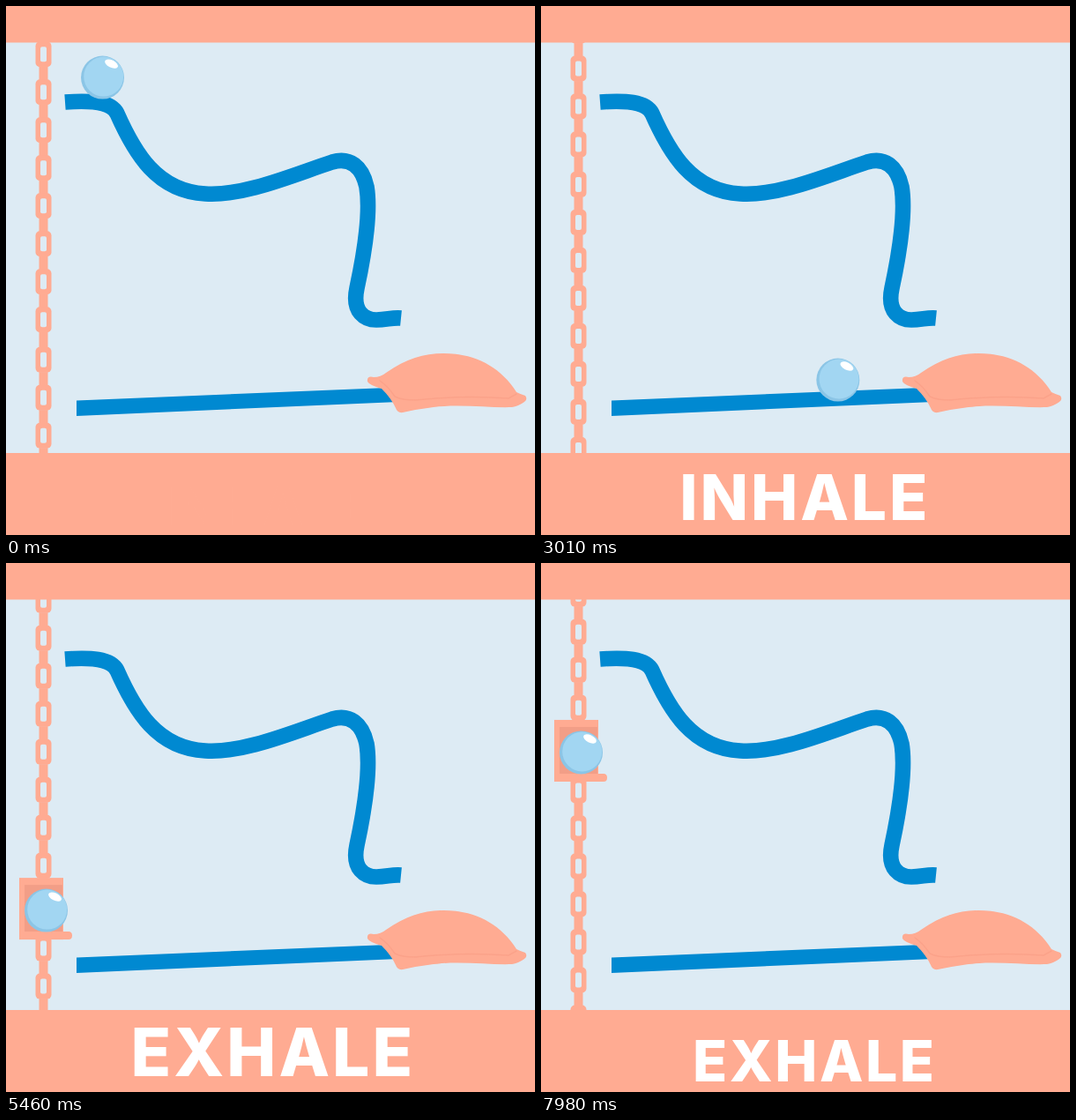
An HTML page for the animation above (8 s loop, 600 by 600 pixels).

```html
<!DOCTYPE html>
<html lang="en">
<head>
<meta charset="utf-8">
<title>Breathing marble run</title>
<style>
  html, body { margin: 0; width: 100%; height: 100%; overflow: hidden; background: #ddebf4; }
  svg { display: block; width: 100vw; height: 100vh; }
  text { font-family: Inter, "Open Sans", sans-serif; font-weight: 800; letter-spacing: .04em; text-anchor: middle; fill: #fff; }
</style>
</head>
<body>
<svg viewBox="0 0 600 600">
  <rect width="600" height="600" fill="#ddebf4"/>
  <path fill="none" stroke="#0089d1" stroke-width="17.600" d="M67 109C95 107 119 108 126 122C146 167 171 210 226 213C270 216 327 191 370 177C390 171 404 182 409 205C414 235 407 278 398 320C392 348 408 356 420 356C432 356 438 353 448 354"/>
  <path fill="#0089d1" d="M80 447.500V465L445 449V432.500Z"/>
  <path id="rail" fill="none" d="M109 81C135 86 140 112 158 140C180 180 205 192 245 190C290 188 335 160 378 152C410 150 430 185 430 225C430 265 420 295 418 315C417 332 424 334 430 331"/>
  <g id="pillow">
    <path fill="#ffab92" d="M410 426Q409 419 417 421Q425 421 431 416C454 400 474 394 496 394C530 394 560 408 579 438Q583 440 589 442Q592 446 588 449Q581 454 574 455C548 456 515 451 485 455Q468 457 450 461Q444 462 442 456Q437 445 426 434Q412 430 410 426Z"/>
    <path fill="none" stroke="#fa9f87" stroke-width="1.500" stroke-linecap="round" opacity=".7" d="M424 425Q434 432 441 443Q449 447 464 447Q520 441 570 445L579 440"/>
  </g>
  <g id="lift">
    <g id="chain"></g>
    <rect x="15" width="50" height="70" fill="#ffab92"/>
    <rect x="21" y="8" width="43" height="53" fill="#f29e87"/>
    <path fill="#ffab92" d="M15 61H71Q75 61 75 65.500Q75 70 71 70H15Z"/>
  </g>
  <g id="ball">
    <circle r="24.500" fill="#8bc5e6"/>
    <circle cx="1.200" cy="-1" r="22.500" fill="#a2d6f2"/>
    <ellipse cx="10" cy="-15.500" rx="8" ry="4.200" fill="#fff" transform="rotate(27 10 -15.500)"/>
  </g>
  <rect width="600" height="41.500" fill="#ffab92"/>
  <rect y="507" width="600" height="93" fill="#ffab92"/>
  <text id="inhale">INHALE</text>
  <text id="exhale">EXHALE</text>
</svg>
<script>
const LOOP = 8000, PITCH = 43;
const JUMP = 1680, LAND = 2130, ROLL = 2542;
const el = id => document.getElementById(id);
const ramp = (t, a, b) => Math.max(0, Math.min(1, (t - a) / (b - a)));
const smooth = v => v * v * (3 - 2 * v);
const mix = (a, b, v) => a + (b - a) * v;

const rail = el("rail"), railLength = rail.getTotalLength();

// The lift climbs slowly, pauses a little for the ball, then speeds up.
function liftTop(t) {
  if (t < 3850) return 462 + (3850 - t) * .066;
  if (t < 4900) return mix(462, 397, ramp(t, 3850, 4900));
  return 397 - (t - 4900) * .0711;
}

function ballAt(t, top) {
  if (t < JUMP) {
    const p = rail.getPointAtLength(railLength * (1 - (1 - t / JUMP) ** 1.6));
    return [p.x, p.y];
  }
  if (t < LAND) {
    const s = t - JUMP;
    return [430 + s * .18, 331 - s * .26 + s * s * .00083];
  }
  if (t < ROLL) {
    const u = ramp(t, LAND, ROLL);
    return [mix(511, 415, u), mix(382, 421.5, u * u)];
  }
  const x = Math.max(45.5, 337 - (t - 3010) / 6);
  return [x, Math.min(432 - Math.max(0, x - 80) * .031, top + 37)];
}

function link(y) {
  return `<rect x="33.500" y="${y - 14.5}" width="18" height="29" rx="5" fill="#ffab92"/>`
    + `<rect x="39" y="${y - 8.5}" width="7" height="17" rx="2" fill="#ddebf4"/>`
    + `<rect x="37.500" y="${y + 14}" width="10" height="18" fill="#ffab92"/>`;
}

// Links come in strips of eight with a small gap at each joint.
let links = "";
for (let i = 17; i >= 0; i--) links += link(-13.8 - PITCH * i - 2.5 * Math.floor(i / 8));
for (let i = 0; i < 11; i++) links += link(80 + PITCH * i);
el("chain").innerHTML = links;

function word(id, size, mid, base, alpha) {
  const node = el(id);
  node.setAttribute("font-size", size);
  node.setAttribute("x", mid + size * .02);
  node.setAttribute("y", base);
  node.setAttribute("opacity", alpha);
}

function draw(t) {
  const top = liftTop(t);
  el("lift").setAttribute("transform", `translate(0 ${top})`);
  el("ball").setAttribute("transform", `translate(${ballAt(t, top)})`);

  const dent = smooth(ramp(t, 2110, 2220)) * (1 - smooth(ramp(t, 2260, 2640)));
  el("pillow").setAttribute("transform",
    `translate(500 455) scale(${1 + .04 * dent} ${1 - .16 * dent}) translate(-500 -455)`);

  const a = (t - 1890) / 1960, b = (t - 6160) / 1820;
  word("inhale", 67.4 + 6.8 * a, 296.5 + 2.5 * a, 585 - 4 * a,
    ramp(t, 0, 180) * (1 - ramp(t, 4200, 4380)));
  word("exhale", 72 - 7.7 * b, 303.5 + 5.5 * b, 584 + 4 * b, ramp(t, 4920, 5080));
}

function tick() {
  draw(performance.now() % LOOP);
  requestAnimationFrame(tick);
}
draw(0);
requestAnimationFrame(tick);
</script>
</body>
</html>
```
